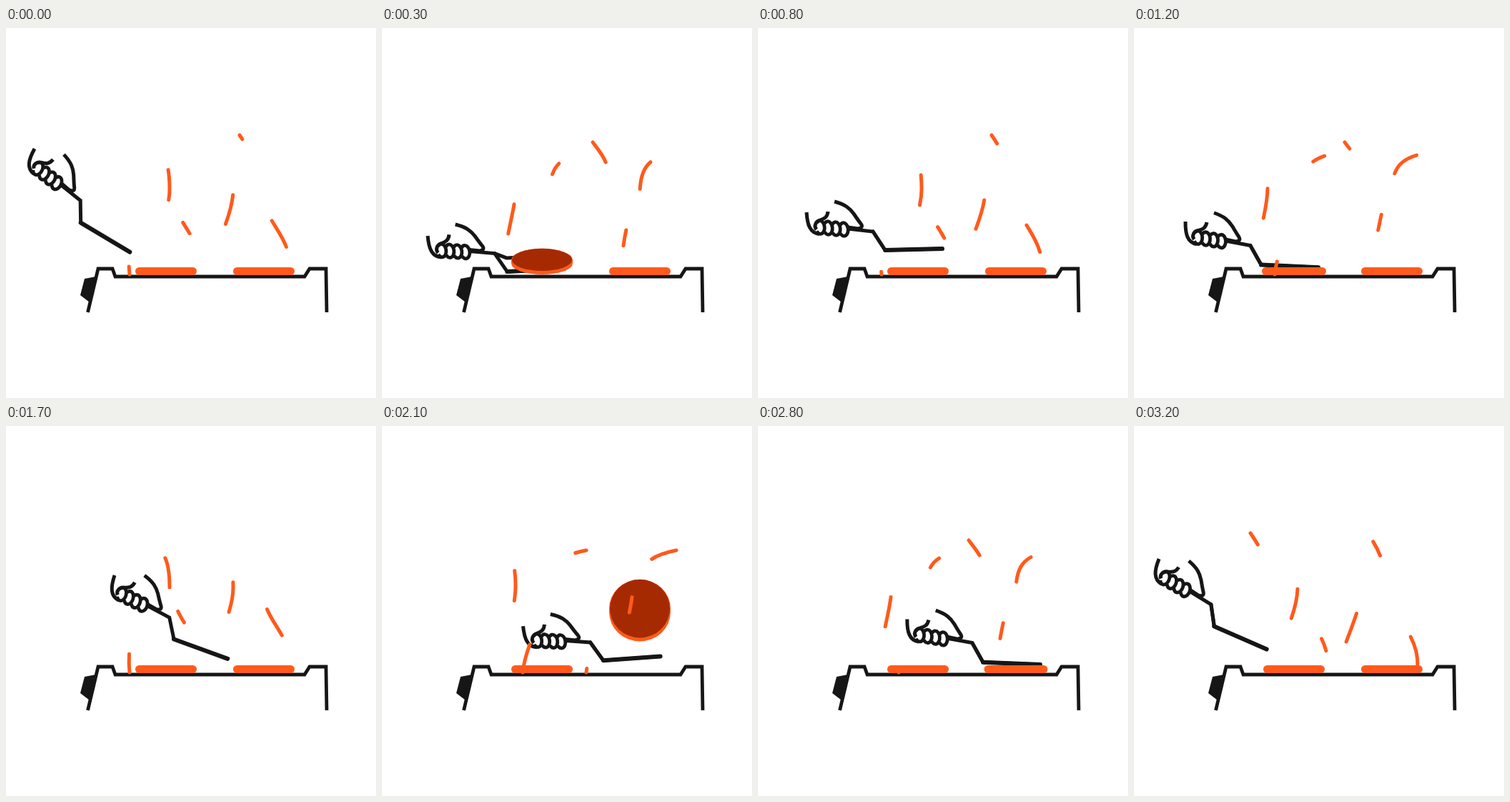
Write an HTML page with a canvas that moves like this. It is 518 by 518 pixels and loops after 3300 ms.

```html
<!DOCTYPE html>
<html lang="en">
<head>
<meta charset="utf-8">
<title>Grill</title>
<style>
  html, body { margin: 0; width: 100%; height: 100%; overflow: hidden; background: #fff; }
  canvas { display: block; }
</style>
</head>
<body>
<canvas id="stage" width="518" height="518"></canvas>
<script>
const ctx = document.getElementById('stage').getContext('2d');
const INK = '#161616', ORANGE = '#ff5a1c', SEARED = '#a52a02';
const LOOP = 3300, STEP = 100, HALF = LOOP / 2;
const PUFF = LOOP / 4, SPACING = 243;
const REACH = 137;

const clamp = k => Math.min(1, Math.max(0, k));
const ease = k => k * k * (3 - 2 * k);
const hump = k => Math.sin(Math.PI * clamp(k));

// One flip: lower, slide under, lift away, hover, press
const flipPoses = n => [
  { t: 150, x: 20, y: 250, turn: 12 },
  { t: 300, x: 64, y: 291, turn: -1.5 },
  { t: 720, x: 52, y: 254, turn: -5.3 },
  { t: 800, x: 68, y: 258, turn: 0 },
  { t: 1200, x: 72, y: 271, turn: 4 }
].map(p => ({ ...p, t: p.t + n * HALF, x: p.x + n * REACH }));

const POSES = [
  { t: 0, x: 40, y: 169, turn: 32.3 },
  ...flipPoses(0),
  { t: 1700, x: 152, y: 209, turn: 21.4 },
  ...flipPoses(1),
  { t: 3200, x: 35, y: 186, turn: 25 },
  { t: LOOP, x: 40, y: 169, turn: 32.3 }
];

function armAt(t) {
  const i = POSES.findIndex(p => p.t > t);
  const a = POSES[i - 1], b = POSES[i];
  const k = ease((t - a.t) / (b.t - a.t));
  const mix = key => a[key] + (b[key] - a[key]) * k;
  return { x: mix('x'), y: mix('y'), turn: mix('turn') };
}

// Steam curves run upwards from the pan.
const SWAY = new Path2D('M173 345 C168 300 187 260 187 224 S178 172 163 150');
const BEND = new Path2D('M286 345 C290 305 318 265 318 226 S311 181 295 160');
const CURL = new Path2D('M396 345 C404 292 361 275 361 234 S373 182 412 174');
const LONG = 42;

// head: distance of the leading end along the curve at time zero
const STEAM = [
  { path: SWAY, x: 0, head: 11, len: LONG },
  { path: BEND, x: -89, head: 151, len: LONG },
  { path: CURL, x: -126, head: 78, len: 18 },
  { path: BEND, x: 0, head: 116, len: LONG },
  { path: SWAY, x: 164, head: 217, len: 22 },
  { path: CURL, x: 0, head: 81, len: LONG }
];

// Hand and spatula are drawn level, with the wrist at WRIST.
const WRIST = { x: 68, y: 258 };
const HAND = new Path2D(
  'M68 258 C69 276 73 287 86 288.5' +
  'M98 257 C97 265 93 267 87 269 C80 271 78 278 82 282' +
  'M107 243 C122 247 128 252 134 260 C138 266 140 269 144 274 C147 278 145 280 140 281 L126 279');
const HANDLE = new Path2D('M126 281 L161 285 L178 311');
const BLADE = new Path2D('M178 311 L258 309');
const STOVE = new Path2D('M114.5 398 L129 337 H149 L153 348 H418 L425 337 H448 L449 398');
const KNOB = new Path2D('M126 348 L110 351 L104 374 L117 384 Z');

function line(path, color, width, cap = 'butt', join = 'miter') {
  ctx.strokeStyle = color;
  ctx.lineWidth = width;
  ctx.lineCap = cap;
  ctx.lineJoin = join;
  ctx.stroke(path);
}

function fill(path, color) {
  ctx.fillStyle = color;
  ctx.fill(path);
}

function drawTool(t) {
  const { x, y, turn } = armAt(t);
  const twist = hump((t % HALF - 200) / 200);
  ctx.save();
  ctx.translate(x, y);
  ctx.rotate(turn * Math.PI / 180);
  ctx.translate(-WRIST.x, -WRIST.y);
  if (twist > 0) {
    const face = new Path2D(
      `M161 285 L178 ${311 - 19 * twist} L${258 - 4 * twist} ${309 - 19 * twist} L258 309 L178 311`);
    fill(face, '#fff');
    line(face, INK, 5, 'round', 'round');
  }
  line(HANDLE, INK, 5);
  line(BLADE, INK, 6, 'round');
  line(HAND, INK, 5, 'butt', 'round');
  for (let i = 0; i < 4; i++) {
    const finger = new Path2D();
    finger.ellipse(87 + 11 * i, 279 + i, 6.2, 9.3, -0.1, -2.4, 2.6);
    line(finger, INK, 4.8);
  }
  ctx.restore();
}

// u: time since this patty's turn began
function drawPatty(mid, u) {
  const half = 43 + 2 * hump((u - 1100) / 200);
  const lean = hump((u - 260) / 330);
  if (lean < 0.01) {
    const flat = new Path2D();
    flat.roundRect(mid - half, 335, half * 2, 11, 5.5);
    fill(flat, ORANGE);
    return;
  }
  const ry = 42 * lean, thick = 11 - 6 * clamp(lean / 0.36);
  const low = 346 - 50 * lean ** 4 - ry, top = low - thick;
  const body = new Path2D(), face = new Path2D();
  body.ellipse(mid, top, half, ry, 0, Math.PI, 0);
  body.ellipse(mid, low, half, ry, 0, 0, Math.PI);
  face.ellipse(mid, top, half - 1, ry, 0, 0, 7);
  fill(body, ORANGE);
  fill(face, SEARED);
}

function drawSteam(t) {
  const rise = t / PUFF * SPACING;
  for (const { path, x, head, len } of STEAM) {
    ctx.save();
    ctx.translate(x, 0);
    ctx.setLineDash([len, SPACING - len]);
    ctx.lineDashOffset = len - head - rise;
    line(path, ORANGE, 5, 'round');
    ctx.restore();
  }
}

function draw(t) {
  ctx.fillStyle = '#fff';
  ctx.fillRect(0, 0, 518, 518);
  fill(KNOB, INK);
  line(STOVE, INK, 4.8);
  drawTool(t);
  drawPatty(224, t);
  drawPatty(224 + REACH, t - HALF);
  drawSteam(t);
}

const start = performance.now();
function tick() {
  const t = (performance.now() - start) % LOOP;
  draw(Math.floor(t / STEP) * STEP);
  requestAnimationFrame(tick);
}
tick();
</script>
</body>
</html>
```
